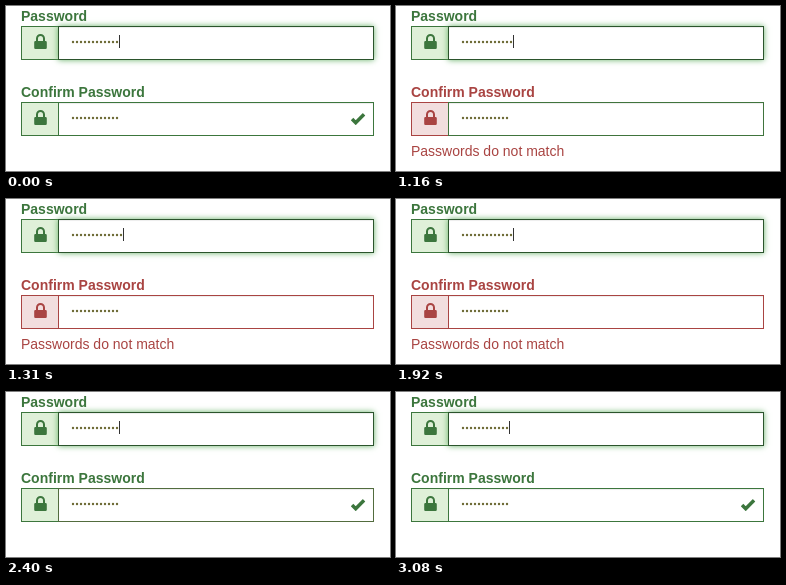
These frames come from a looping animation (384 px wide and 165 px high, 3.49 s). An HTML page:

```html
<!DOCTYPE html>
<html lang="en">
<head>
<meta charset="utf-8">
<title>Password match</title>
<style>
  html, body { margin: 0; width: 100%; height: 100%; overflow: hidden; background: #fff; }
  body { position: relative; font: 14px/20px Arial, "Liberation Sans", sans-serif; }
  .group { --ink: #3c763d; --tint: #dff0d8; position: absolute; left: 15px; width: 353px; color: var(--ink); }
  .group.bad { --ink: #a94442; --tint: #f2dede; }
  label { position: absolute; left: 0; top: 0; font-weight: bold; white-space: nowrap; }
  .addon, .field { position: absolute; top: 20px; height: 34px; box-sizing: border-box; border: 1px solid var(--ink); }
  .addon { left: 0; width: 38px; background: var(--tint); border-right: 0; }
  .field { left: 37px; width: 316px; background: #fff; box-shadow: inset 0 1px 1px rgba(0,0,0,.075); }
  .focus { border-color: #2b542c; box-shadow: inset 0 1px 1px rgba(0,0,0,.075), 0 0 6px #67b168; }
  svg { position: absolute; left: 0; top: 0; width: 353px; height: 60px; fill: var(--ink); }
  .dots { fill: #6d6a35; }
  .help { position: absolute; left: 0; top: 59px; white-space: nowrap; }
</style>
</head>
<body>
<div class="group" style="top:0">
  <label>Password</label>
  <div class="addon"></div><div class="field focus"></div>
  <svg><use href="#lock"/><g class="dots" id="first"></g><rect id="caret" y="29" width="1" height="13" fill="#333"/></svg>
</div>
<div class="group" id="confirm" style="top:76px">
  <label>Confirm Password</label>
  <div class="addon"></div><div class="field" id="field"></div>
  <svg>
    <use href="#lock"/><g class="dots" id="second"></g>
    <path id="check" transform="translate(329.5 43.5) scale(.01167 -.01167)" d="M465 477l571 571q8 8 18 8t17-8l177-177q8-7 8-17t-8-18l-783-784q-7-8-17.5-8t-17.5 8l-384 384q-8 8-8 18t8 17l177 177q7 8 17 8t18-8l171-171q7-7 18-7t18 7z"/>
  </svg>
  <div class="help" id="help">Passwords do not match</div>
</div>
<svg style="width:0;height:0"><defs>
  <path id="lock" fill-rule="evenodd" d="M15 35V32.5a4.5 4.5 0 0 1 9 0V35h.6q1.2 0 1.2 1.2v5.6q0 1.2-1.2 1.2H14.4q-1.2 0-1.2-1.2v-5.6q0-1.2 1.2-1.2zM17 35h5V32.5a2.5 2.5 0 0 0-5 0z"/>
</defs></svg>
<script>
const LOOP = 3490, GREEN = [60, 118, 61], RED = [169, 68, 66];
const $ = id => document.getElementById(id);

// border redness is held between these times
const steps = [[0, 0], [1160, .04], [1240, .8], [1310, 1], [2320, .96], [2400, .2], [2470, 0]];

function drawDots(id, count) {
  let out = "";
  for (let i = 0; i < count; i++) out += `<circle cx="${52 + 4 * i}" cy="36" r="1.2"/>`;
  $(id).innerHTML = out;
}

let shown = -1;
function frame(now) {
  const t = now % LOOP;
  const step = steps.findLastIndex(s => t >= s[0]);
  if (step !== shown) {
    shown = step;
    const bad = t >= 1160 && t < 2320;
    const count = bad ? 13 : 12;
    const mix = GREEN.map((g, i) => Math.round(g + (RED[i] - g) * steps[step][1]));
    $("confirm").classList.toggle("bad", bad);
    $("field").style.borderColor = `rgb(${mix})`;
    $("help").style.display = bad ? "block" : "none";
    $("check").style.display = bad ? "none" : "inline";
    $("caret").setAttribute("x", 50 + 4 * count);
    drawDots("first", count);
  }
  requestAnimationFrame(frame);
}
drawDots("second", 12);
frame(performance.now());
</script>
</body>
</html>
```
